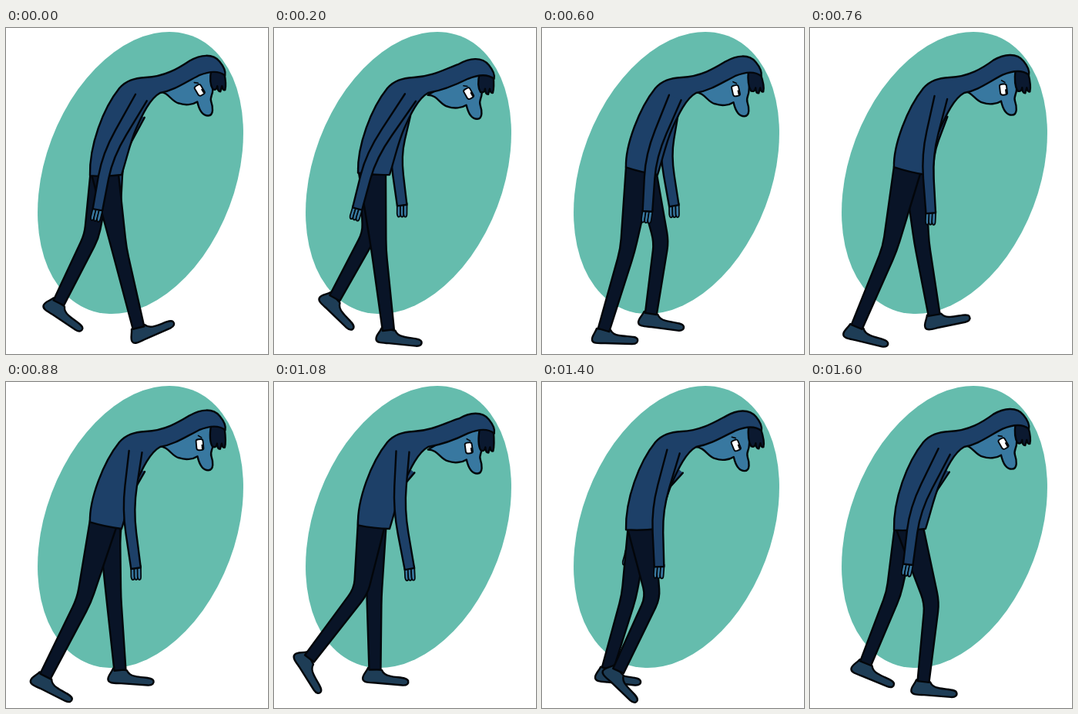
Recreate the animation shown at these times as an HTML page with a canvas. Size 340 px wide and 422 px high, loop 1.68 s.

```html
<!DOCTYPE html>
<html lang="en">
<head>
<meta charset="utf-8">
<title>Weary walk</title>
<style>
  html, body { margin: 0; width: 100%; height: 100%; overflow: hidden; background: #fff; }
  canvas { display: block; width: 340px; height: 422px; }
</style>
</head>
<body>
<canvas id="stage"></canvas>
<script>
const W = 340, H = 422, LOOP = 1680, STEP = 40, LAST = 1600;
const C = {
  bg: '#65bcad', hoodie: '#1d4068', pants: '#091427', shoe: '#1e3d56',
  skin: '#3878a0', hair: '#0b1930', line: '#03060a'
};

// One stride, shared by both legs: time, ankle x, lift, foot angle, knee bend.
const stride = [
  [0, 172, 3, -25, -3],
  [160, 153, 0, 2, -2],
  [440, 119, 1, 4, -1],
  [600, 80, 0, 0, 8],
  [880, 51, 10, 25, 13],
  [1080, 46, 33, 56, 27],
  [1400, 99, 17, 42, 31],
  [1600, 147, 3, 3, 21]
];

const near = {
  leg: { delay: 0, scale: 1, ground: 391, hip: 127, sway: 0, width: 18 },
  arm: { peak: 1060, x: 0, shoulder: 90, lift: 0 }
};
const far = {
  leg: { delay: 700, scale: .75, ground: 373, hip: 130, sway: .12, width: 14 },
  arm: { peak: 430, x: 2, shoulder: 112, lift: 11 }
};

const canvas = document.getElementById('stage');
const ctx = canvas.getContext('2d');
const dpr = window.devicePixelRatio || 1;
canvas.width = W * dpr;
canvas.height = H * dpr;

// Swings between -1 and 1, highest at the time peak.
const wave = (t, peak, period = LOOP) => Math.cos(2 * Math.PI * (t - peak) / period);
const mix = (p, q, u) => [p[0] + (q[0] - p[0]) * u, p[1] + (q[1] - p[1]) * u];

// Smooth cyclic curve through the rows of a track.
function sample(track, time) {
  const t = (time + LOOP) % LOOP, n = track.length;
  const row = i => track[(i + n) % n];
  const at = i => row(i)[0] + Math.floor(i / n) * LOOP;
  let i = n - 1;
  while (track[i][0] > t) i--;
  const span = at(i + 1) - at(i), u = (t - at(i)) / span;
  const slope = (j, k) => (row(j + 1)[k] - row(j - 1)[k]) / (at(j + 1) - at(j - 1)) * span;
  return row(i).slice(1).map((a, c) => {
    const k = c + 1, b = row(i + 1)[k], ma = slope(i, k), mb = slope(i + 1, k);
    return a + u * (ma + u * (3 * (b - a) - 2 * ma - mb + u * (2 * (a - b) + ma + mb)));
  });
}

function ink(d, fill, width = 2.4) {
  const path = new Path2D(d);
  if (fill) { ctx.fillStyle = fill; ctx.fill(path); }
  ctx.lineWidth = width;
  ctx.strokeStyle = C.line;
  ctx.stroke(path);
}

function local(x, y, deg, draw) {
  ctx.save();
  ctx.translate(x, y);
  ctx.rotate(deg * Math.PI / 180);
  draw();
  ctx.restore();
}

// Tapered two-part limb, open at the top; bend sets how round the joint is.
function limb(pts, widths, bend, fill) {
  const dir = (p, q) => Math.atan2(q[1] - p[1], q[0] - p[0]);
  const a = dir(pts[0], pts[1]), b = dir(pts[1], pts[2]);
  const angles = [a, (a + b) / 2, b];
  const edge = s => pts.map((p, i) => [
    p[0] - Math.sin(angles[i]) * widths[i] * s,
    p[1] + Math.cos(angles[i]) * widths[i] * s
  ]);
  const run = ([p, q, r]) =>
    `${p} L${mix(q, p, bend)} Q${q} ${mix(q, r, bend)} L${r}`;
  ink(`M${run(edge(1))} L${run(edge(-1).reverse())}`, fill);
}

function leg({ delay, scale, ground, hip, sway, width }, t) {
  const [x, lift, turn, bend] = sample(stride, t - delay);
  const ankle = [140 + (x - 140) * scale, ground - lift * scale];
  const top = [hip + (ankle[0] - 115) * sway, 180];
  const [kx, ky] = mix(top, ankle, .51);
  local(...ankle, turn * scale, () => ink(
    'M-9-2 C-11 4-16 8-15 13 C-14 18-6 17 2 17 L37 18 ' +
    'C43 18 45 15 44 12 C42 7 30 9 20 7 Q12 6 9 0 Z', C.shoe));
  limb([top, [kx + bend * scale, ky], ankle], [width, 9.5, 7.5], .12, C.pants);
}

function arm({ peak, x, shoulder, lift }, t) {
  const s = wave(t, peak);
  const wrist = [142 + x + 34 * s, 238 - lift + 4 * s];
  local(...wrist, 7 - 10 * s, () => {
    for (const f of [-4.2, 0, 4.2]) {
      ink(`M${f - 2.2}-3 V11 Q${f - 1.5} 15 ${f} 15 Q${f + 2.2} 15 ${f + 2.2} 11 V-3 Z`, C.skin, 1.7);
    }
  });
  limb([[172 - 5 * s, shoulder], [144 + x + 18 * s, 165], wrist], [8.5, 7.2, 6.3], .4, C.hoodie);
}

function head(x, y, t) {
  const hairX = 2.5 + 2.2 * wave(t, 600, LOOP / 2);
  const hairY = 2.5 + 2.5 * wave(t, 1050);
  const tip = (px, py) => `${px + hairX} ${py + hairY}`;
  ctx.save();
  ctx.translate(x, y);
  ink('M198 84 C211 84 214 97 224 99 C232 102 242 101 248 97 ' +
      'C250 106 254 115 262 115 C270 115 268 103 266 97 ' +
      'C264 91 268 88 268 82 L270 56 L240 60 Z', C.skin);
  ink(`M${265 + hairX / 2} 56 Q${tip(261, 72)} ${tip(266, 80)} Q${tip(271, 82)} ${tip(272, 76)} ` +
      `Q${tip(272, 83)} ${tip(276, 83)} L${tip(278, 76)} Q${tip(279, 82)} ${tip(282, 81)} ` +
      `Q${tip(284, 74)} 283 60 Z`, C.hair);
  local(251, 82, 13 * wave(t, 900) - 18, () => {
    ink('M-4.5-5 Q-4.5-7-1-7 H2 Q4.5-7 4.5-4 V5 Q4.5 7 1 7 H-1 Q-4.5 7-4.5 4 Z', '#fff', 1.9);
    ctx.fillStyle = C.line;
    ctx.fillRect(2, 0, 2.5, 6);
    ink('M-1-12 L3-9', null, 1.6);
  });
  ctx.restore();
}

function torso(x, y, hem) {
  // Points of the hood follow the head.
  const h = (px, py) => `${px + x} ${py + y}`;
  ink(`M109 ${hem} C108 152 126 104 147 78 C156 68 166 65 181 64 ` +
      `C206 63 224 52 ${h(238, 44)} C${h(252, 36)} ${h(268, 34)} ${h(277, 45)} ` +
      `C${h(282, 51)} ${h(285, 58)} ${h(284, 63)} C${h(275, 56)} ${h(262, 58)} ${h(250, 63)} ` +
      `C${h(232, 72)} 218 81 200 84 C187 91 177 112 169 130 ` +
      `C161 148 157 168 150 190 Q130 ${hem / 2 + 97} 109 ${hem} Z`, C.hoodie);
}

function draw(t) {
  ctx.setTransform(dpr, 0, 0, dpr, 0, 0);
  ctx.lineJoin = ctx.lineCap = 'round';
  ctx.fillStyle = '#fff';
  ctx.fillRect(0, 0, W, H);
  ctx.fillStyle = C.bg;
  ctx.beginPath();
  ctx.ellipse(174.5, 187.5, 123.4, 189.5, 20.7 * Math.PI / 180, 0, 2 * Math.PI);
  ctx.fill();

  const bob = wave(t, 320, LOOP / 2);
  const x = 1 + bob, y = .8 + 3.2 * bob;
  arm(far.arm, t);
  leg(far.leg, t);
  leg(near.leg, t);
  head(x, y, t);
  torso(x, y, 186 + 6 * wave(t, LOOP - 150));
  arm(near.arm, t);
}

const start = performance.now();
function tick() {
  const t = (performance.now() - start) % LOOP;
  draw(Math.min(Math.floor(t / STEP) * STEP, LAST));
  requestAnimationFrame(tick);
}
tick();
</script>
</body>
</html>
```
